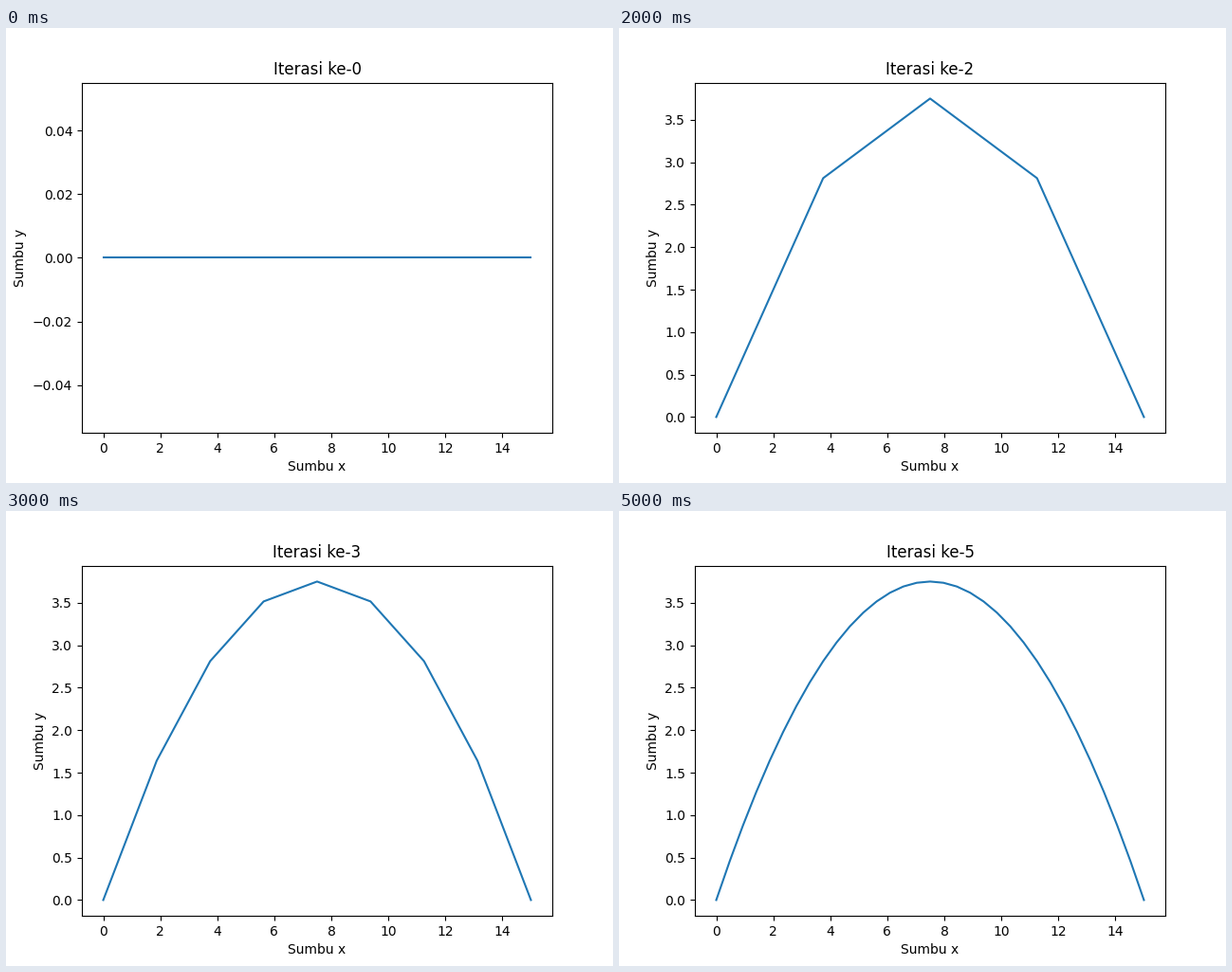
A matplotlib script for the animation above (6000 ms loop, 640 by 480 pixels).

```python
import numpy as np
import matplotlib.pyplot as plt
from matplotlib.animation import FuncAnimation

STEPS = 6
WIDTH = 15
PEAK = 3.75

fig, ax = plt.subplots(figsize=(6.4, 4.8), dpi=100)


def curve(step):
    """Midpoint subdivision of a quadratic Bezier curve: 2**step segments."""
    t = np.linspace(0, 1, 2**step + 1)
    return WIDTH * t, 4 * PEAK * t * (1 - t)


def draw(step):
    ax.clear()
    ax.plot(*curve(step))
    ax.set_title(f"Iterasi ke-{step}")
    ax.set_xlabel("Sumbu x")
    ax.set_ylabel("Sumbu y")


anim = FuncAnimation(fig, draw, frames=STEPS, init_func=lambda: draw(0),
                     interval=1000, repeat=True, repeat_delay=0)
plt.show()
```
